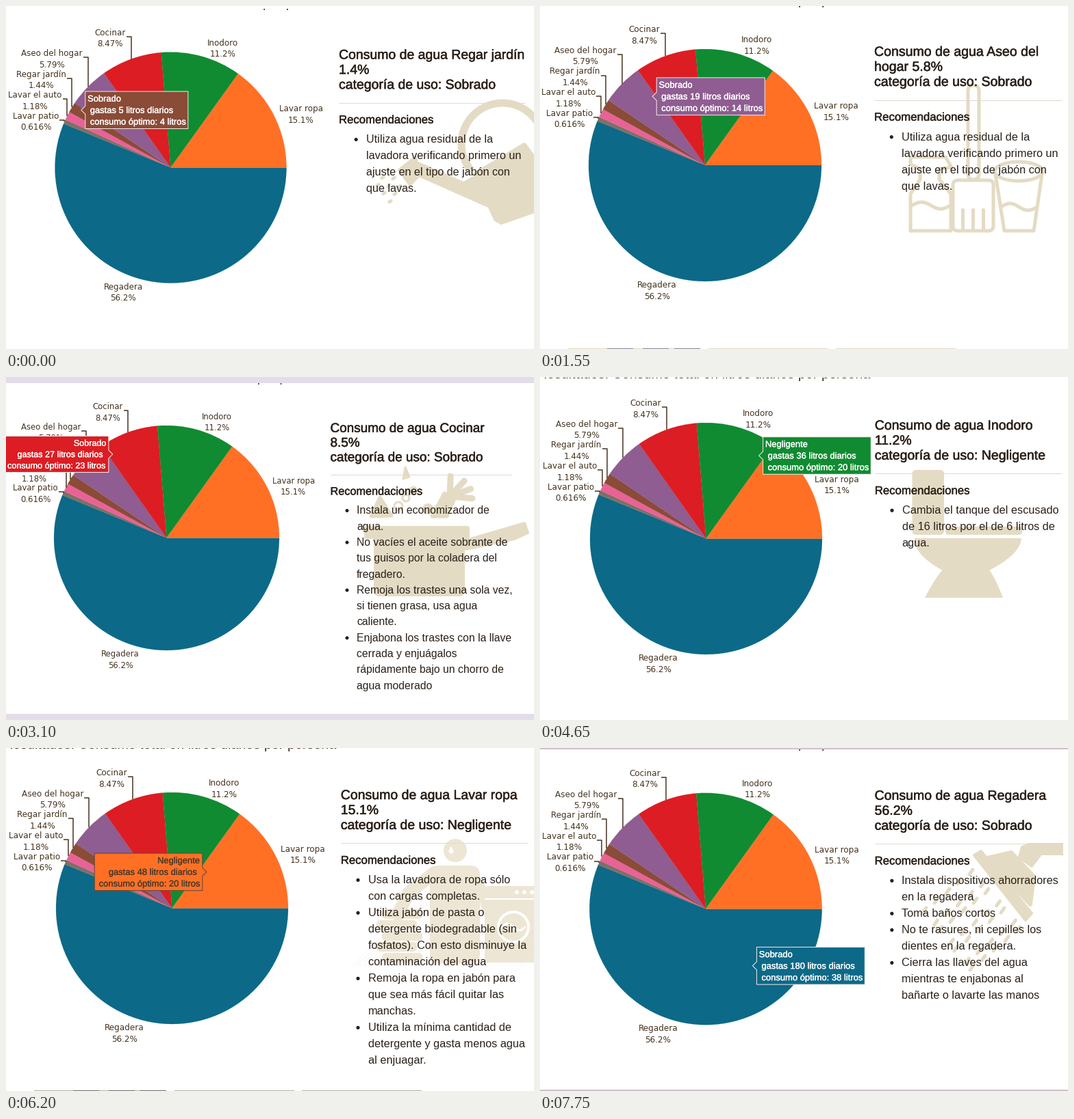
A matplotlib script that plays this animation: 771 px wide and 502 px high, repeating every 9300 ms.

```python
import math
import numpy as np
import matplotlib.pyplot as plt
from matplotlib.animation import FuncAnimation
from matplotlib.patches import Arc, Circle, Ellipse, FancyBboxPatch, Polygon, Rectangle, Wedge
from matplotlib.patheffects import withStroke
from matplotlib.textpath import TextPath

W, H, DPI = 771, 502, 64
PT = 72 / DPI
SANS = "Liberation Sans"

INK, LABEL, TAN, PALE = "#2a2018", "#45331f", "#e4dbc4", "#ede6d5"
LILAC, ROSE = "#e5dcea", "#d3bfc8"

SLICES = [
    ("Lavar ropa", 15.1, "#ff7025"),
    ("Inodoro", 11.2, "#108b31"),
    ("Cocinar", 8.47, "#dc1d23"),
    ("Aseo del hogar", 5.79, "#8f5d91"),
    ("Regar jardín", 1.44, "#8a4b37"),
    ("Lavar el auto", 1.18, "#e96296"),
    ("Lavar patio", 0.616, "#7d7068"),
    ("Regadera", 56.2, "#0c6988"),
]
VALUES = np.array([v for _, v, _ in SLICES])
SWEEP = 2 * np.pi * VALUES / VALUES.sum()
ENDS = np.cumsum(SWEEP)
MID = ENDS - SWEEP / 2

fig = plt.figure(figsize=(W / DPI, H / DPI), dpi=DPI, facecolor="white")
ax = fig.add_axes([0, 0, 1, 1])


def put(patch, z=1):
    patch.set_zorder(z)
    ax.add_patch(patch)


def rect(x0, y0, x1, y1, color, z=1):
    put(Rectangle((x0, y0), x1 - x0, y1 - y0, fc=color, lw=0), z)


def rbox(x0, y0, x1, y1, rad, color=TAN, lw=0):
    put(FancyBboxPatch((x0, y0), x1 - x0, y1 - y0, fc="none" if lw else color, ec=color,
                       lw=lw * PT, boxstyle=f"round,pad=0,rounding_size={rad}"))


def poly(pts, color=TAN, soft=0.0):
    put(Polygon(pts, fc=color, ec=color, lw=soft * PT, joinstyle="round"))


def disc(x, y, r, color=TAN, z=1):
    put(Circle((x, y), r, fc=color, lw=0), z)


def ring(x, y, r, lw, color=TAN):
    put(Circle((x, y), r, fc="none", ec=color, lw=lw * PT))


def line(pts, w, color=TAN, z=1, cap="round"):
    x, y = zip(*pts)
    ax.plot(x, y, color=color, lw=w * PT, zorder=z,
            solid_capstyle=cap, solid_joinstyle="round")


def wave(x0, x1, y, amp, w, color=TAN):
    x = np.linspace(x0, x1, 30)
    line(list(zip(x, y - amp * np.sin(2 * np.pi * (x - x0) / (x1 - x0)))), w, color)


def text(x, y, s, size, color=INK, ha="left", bold=0.0, z=5):
    fx = [withStroke(linewidth=bold * PT, foreground=color)] if bold else None
    ax.text(x, y, s, fontsize=size * PT, color=color, ha=ha, va="baseline",
            family=SANS, path_effects=fx, zorder=z)


def width(s, size):
    return TextPath((0, 0), s, size=size, prop={"family": SANS}).get_extents().width


def wrap(s, size, limit):
    rows = []
    for word in s.split():
        if rows and width(f"{rows[-1]} {word}", size) <= limit:
            rows[-1] += " " + word
        else:
            rows.append(word)
    return rows


def watering_can():
    put(Arc((725, 202), 120, 120, theta1=140, theta2=330, ec=TAN, lw=11 * PT))
    poly([(685, 246), (757, 203), (780, 235), (780, 297), (723, 317), (715, 312)], soft=6)
    poly([(600, 228), (668, 258), (686, 248), (704, 294), (596, 246)], soft=2)
    poly([(598, 221), (604, 247), (590, 262), (574, 240)], soft=4)
    for row in range(3):
        for col in range(3):
            put(Ellipse((557 + 9 * col - 7 * row, 240 + 12 * col + 11 * row), 8, 5,
                        angle=-35, fc=TAN, lw=0))


def cleaning_tools():
    w = 5
    rbox(625, 116, 641, 254, 8, lw=w)
    rbox(603, 255, 662, 329, 7, lw=w)
    for x in (617, 632, 647):
        line([(x, 298), (x, 327)], w)
    line([(541, 329), (541, 275), (555, 254), (555, 238), (541, 232), (541, 221),
          (592, 221), (601, 236), (583, 238), (583, 254), (600, 275), (600, 329),
          (541, 329)], w)
    wave(543, 599, 292, 5, w)
    put(Ellipse((699, 242), 70, 28, fc="none", ec=TAN, lw=w * PT))
    line([(665, 246), (678, 329), (721, 329), (733, 246)], w)
    wave(673, 726, 294, 5, w)


def cooking_pot():
    rbox(537, 222, 670, 321, 8)
    rbox(523, 218, 677, 237, 4)
    poly([(672, 239), (757, 214), (762, 228), (742, 237), (672, 252)], soft=4)
    poly([(533, 204), (546, 176), (563, 203)], soft=5)
    poly([(622, 204), (640, 170), (655, 178), (644, 204)], soft=5)
    for a in np.radians([-88, -50, -22, 5]):
        line([(648, 175), (648 + 33 * math.cos(a), 175 + 30 * math.sin(a))], 9)
    poly([(583, 132), (589, 146), (580, 149)], soft=3)
    disc(616, 193, 8)
    for k in range(3):
        ring(595 - 11 * k, 165 + 12 * k, 4 + k, 3)


def toilet():
    rbox(543.5, 136, 590, 231, 6)
    rbox(592, 219, 704, 231, 5)
    y = np.linspace(236, 323, 60)
    bowl = 44 * (1 - np.clip((y - 236) / 47, 0, 1) ** 2)
    foot = 23 * np.clip((y - 283) / 40, 0, 1) ** 0.8
    half, mid = 34 + bowl + foot, np.linspace(625, 619, 60)
    poly(list(zip(mid - half, y)) + list(zip(mid + half, y))[::-1])


def laundry():
    for x in range(610, 860, 6):
        line([(x, 215), (x - 105, 320)], 1, "#faf7f1")
    disc(656, 150, 17, PALE)
    disc(650, 151, 3.5, "white")
    poly([(647, 150), (650, 143), (653, 150)], "white")
    rbox(619, 172, 692, 315, 14, PALE)
    line([(626, 182), (588, 212), (572, 244)], 19, PALE)
    line([(678, 184), (698, 214), (704, 238)], 17, PALE)
    for k in range(5):
        shift = 4 * (-1) ** k
        rbox(545 + shift, 236 + 16 * k, 604 + shift, 250 + 16 * k, 6, PALE)
    rbox(699, 202, 785, 314, 5, PALE)
    rect(699, 220, W, 222, "white")
    for x in (746, 757, 768):
        disc(x, 211, 3, "white")
    ring(741, 262, 22, 4, "white")
    wave(724, 758, 262, 5, 3, "white")


def shower():
    rect(712, 139, 764, 157, TAN)
    poly([(700, 160), (704, 145), (716, 141), (730, 157), (718, 173)], soft=4)
    poly([(653, 161), (688, 153), (721, 188), (716, 229)], soft=6)
    poly([(634, 157), (644, 151), (718, 242), (709, 252)], soft=4)
    for row in range(7):
        for col in range(5):
            x = 632 + 11.5 * row - 17 * col + 5 * (row % 2)
            y = 178 + 14 * row + 14 * col + 4 * (row % 2)
            if y < 320:
                line([(x, y), (x - 5, y + 7)], 5)


def film_strip(light, dark):
    for x in (41, 246, 432):
        rect(x, 500.6, x + 175, H, light, 6)
    for x in (98, 150, 196):
        rect(x, 500.6, x + 38, H, dark, 6)


REUSE = ["Utiliza agua residual de la lavadora verificando primero un "
         "ajuste en el tipo de jabón con que lavas."]

# pie = centre and radius; head = baseline of the page heading
SCENES = [
    dict(pie=(240.5, 236.5, 169), part=4, use="Sobrado", spent=5, best=4,
         icon=watering_can, items=REUSE, head=2, cover=(4.2, "white")),
    dict(pie=(241, 233, 170), part=3, use="Sobrado", spent=19, best=14,
         icon=cleaning_tools, items=REUSE, head=-2.5, strip=("#e3d9bd", "#7f8593")),
    dict(pie=(234.5, 235.5, 164.5), part=2, use="Sobrado", spent=27, best=23,
         icon=cooking_pot,
         items=["Instala un economizador de agua.",
                "No vacíes el aceite sobrante de tus guisos por la coladera del fregadero.",
                "Remoja los trastes una sola vez, si tienen grasa, usa agua caliente.",
                "Enjabona los trastes con la llave cerrada y enjuágalos rápidamente "
                "bajo un chorro de agua moderado"],
         head=7, cover=(9, LILAC), foot=(492.5, LILAC)),
    dict(pie=(242.5, 236.5, 169.5), part=1, use="Negligente", spent=36, best=20,
         icon=toilet,
         items=["Cambia el tanque del escusado de 16 litros por el de 6 litros de agua."],
         head=2, cover=(1.2, "white")),
    dict(pie=(242.5, 234.5, 169.5), part=0, use="Negligente", spent=48, best=20,
         icon=laundry,
         items=["Usa la lavadora de ropa sólo con cargas completas.",
                "Utiliza jabón de pasta o detergente biodegradable (sin fosfatos). "
                "Con esto disminuye la contaminación del agua",
                "Remoja la ropa en jabón para que sea más fácil quitar las manchas.",
                "Utiliza la mínima cantidad de detergente y gasta menos agua al enjuagar."],
         head=0.8, strip=("#b5b0a5", "#6b6a6a")),
    dict(pie=(242, 235.5, 169.7), part=7, use="Sobrado", spent=180, best=38,
         icon=shower,
         items=["Instala dispositivos ahorradores en la regadera",
                "Toma baños cortos",
                "No te rasures, ni cepilles los dientes en la regadera.",
                "Cierra las llaves del agua mientras te enjabonas al bañarte "
                "o lavarte las manos"],
         head=0, cover=(1.7, ROSE), foot=(500, ROSE)),
]


def draw_pie(cx, cy, r):
    s = r / 170
    floor = math.inf
    # labels on the upper left pile up, so go round from the last slice
    for i in reversed(range(len(SLICES))):
        name, value, color = SLICES[i]
        a, b = np.degrees([ENDS[i] - SWEEP[i], ENDS[i]])
        put(Wedge((cx, cy), r, -b, -a, fc=color, ec=color, lw=0.2), 2)

        c, n = math.cos(MID[i]), math.sin(MID[i])
        side = 1 if c > 0 else -1
        px, py = cx + r * c, cy - r * n
        y = py - 15 * s * n * abs(n)
        if c < 0 < n:
            y = min(y, floor)
            floor = y - 30.7 * s
            line([(px, py), (px, y), (px - 7 * s, y)], 1.5, LABEL, 3, "butt")
        ax.text(px + 8 * s * side, y - 12.2 * s, f"{name}\n{value}%", fontsize=12 * s * PT,
                color=LABEL, family="DejaVu Sans", linespacing=1.36, va="top",
                ha="left" if side > 0 else "right", multialignment="center", zorder=3)


def draw_tip(cx, cy, r, part, use, spent, best):
    s, color = r / 170, SLICES[part][2]
    # the arrow touches the side of the circle inscribed in the slice
    sine = math.sin(min(SWEEP[part] / 2, math.pi / 2))
    fit = sine / (1 + sine)
    side = -1 if part in (0, 2) else 1
    x = cx + r * (math.cos(MID[part]) * (1 - fit) + side * fit)
    y = cy - r * math.sin(MID[part]) * (1 - fit)

    rows = [use, f"gastas {spent} litros diarios", f"consumo óptimo: {best} litros"]
    half, e = 27.4 * s, 6 * side
    far = x + e + side * (width(rows[2], 13 * s) + 11)
    ink, edge = ("#4a3a2c", "#5c4632") if part == 0 else ("white", "#f4ece8")
    put(Polygon([(x, y), (x + e, y - 6), (x + e, y - half), (far, y - half),
                 (far, y + half), (x + e, y + half), (x + e, y + 6)],
                fc=color, ec=edge, lw=PT), 6)
    shift = (0, 3.7, 3.7) if side > 0 else (0, 3.7, 0)
    for k, row in enumerate(rows):
        text(x + e + side * (3.3 + shift[k]), y + (17 * (k - 1) + 4.4) * s, row, 13 * s,
             ink, "left" if side > 0 else "right", bold=0.25, z=7)


def draw_panel(cx, cy, r, part, use, items):
    s = r / 170

    def at(x, y):
        return cx + x * s, cy + y * s

    name, value, _ = SLICES[part]
    title = wrap(f"Consumo de agua {name} {value:.1f}%", 19.55, 277)
    for k, row in enumerate(title + [f"categoría de uso: {use}"]):
        text(*at(247, -160 + 22 * k), row, 19.55 * s, bold=0.5)
    line([at(247, -95.5), at(521, -95.5)], 1, "#dedad0", 2, "butt")
    text(*at(247, -65.2), "Recomendaciones", 16.8 * s, bold=0.4)
    y = -36.3
    for item in items:
        disc(*at(272.3, y - 5), 2.6 * s, INK, 5)
        for row in wrap(item, 16.25, 234):
            text(*at(287, y), row, 16.25 * s)
            y += 24.07


def draw(i):
    ax.cla()
    ax.set(xlim=(0, W), ylim=(H, 0))
    ax.axis("off")
    sc = SCENES[i % len(SCENES)]
    pie, part, use = sc["pie"], sc["part"], sc["use"]
    cx, _, r = pie
    text(cx + 241 * r / 170, sc["head"],
         "Resultados: Consumo total en litros diarios por persona",
         19.65 * r / 170, LABEL, "right", z=1)
    if "cover" in sc:
        rect(0, 0, W, *sc["cover"], z=4)
    if "foot" in sc:
        top, color = sc["foot"]
        rect(0, top, W, H, color, 4)
    if "strip" in sc:
        film_strip(*sc["strip"])
    sc["icon"]()
    draw_pie(*pie)
    draw_panel(*pie, part, use, sc["items"])
    draw_tip(*pie, part, use, sc["spent"], sc["best"])
    return []


anim = FuncAnimation(fig, draw, frames=len(SCENES), interval=1550,
                     init_func=lambda: draw(0), repeat=True, repeat_delay=0)
plt.show()
```
